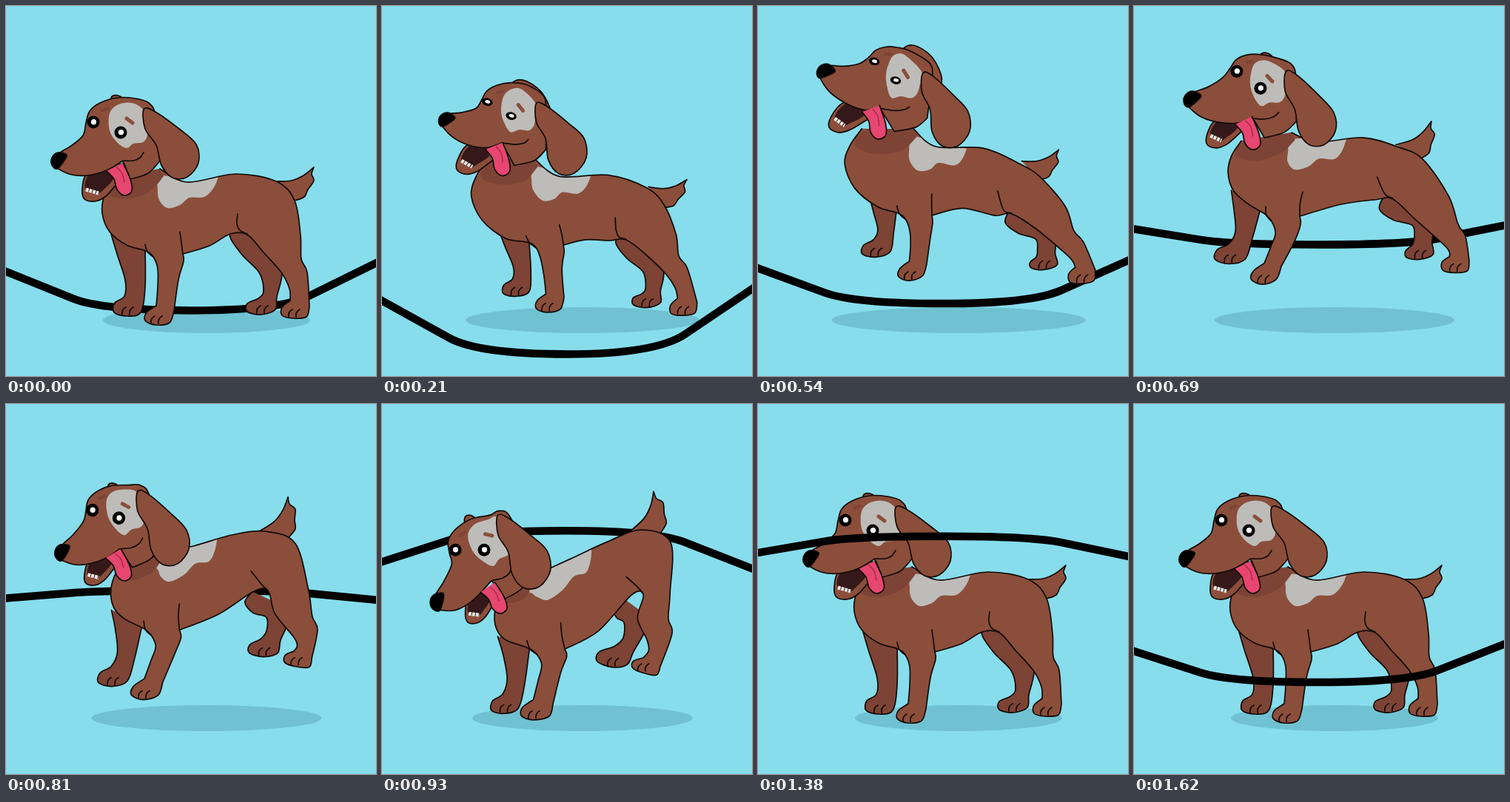
Write an HTML page with a canvas that moves like this. It is 500 px wide and 500 px high and loops after 1.65 s.

```html
<!DOCTYPE html>
<html>
<head>
<meta charset="utf-8">
<title>Dog jumping rope</title>
<style>
html, body { margin: 0; width: 100%; height: 100%; overflow: hidden; background: #87ddec; }
canvas { display: block; }
</style>
</head>
<body>
<canvas id="stage" width="500" height="500"></canvas>
<script>
const ctx = document.getElementById('stage').getContext('2d');
const LOOP = 1650;
const BROWN = '#8b4e3a', DARK = '#7d4335', GREY = '#bdbcb9', INK = '#120a08';

// Joints: x,y when standing, leaping, airborne and landing
const rig = {
  body: {
    nape: [208, 225, 205, 195, 213, 176, 195, 242],
    withers: [245, 238, 236, 217, 247, 184, 255, 209],
    back: [288, 230, 278, 225, 287, 182, 284, 196],
    croup: [365, 237, 350, 246, 355, 190, 350, 170],
    rump: [390, 263, 375, 267, 390, 207, 390, 187],
    hock: [399, 342, 408, 328, 438, 295, 387, 290],
    hindHeel: [410, 406, 444, 388, 453, 343, 376, 355],
    hindToe: [373, 413, 410, 400, 417, 352, 339, 352],
    knee: [372, 360, 400, 360, 418, 322, 358, 318],
    groin: [305, 308, 316, 318, 329, 262, 340, 257],
    belly: [275, 324, 275, 302, 280, 268, 292, 307],
    armpit: [239, 335, 248, 307, 224, 284, 247, 331],
    elbow: [199, 339, 214, 311, 186, 291, 209, 338],
    foreHeel: [227, 412, 257, 372, 199, 352, 231, 405],
    foreToe: [188, 420, 220, 384, 159, 364, 188, 416],
    chest: [163, 323, 168, 299, 155, 268, 168, 319],
    breast: [130, 280, 113, 232, 127, 225, 152, 290],
    throat: [145, 232, 140, 180, 145, 182, 170, 245]
  },
  head: {
    nose: [71, 208, 100, 99, 78, 125, 75, 267],
    stop: [106, 172, 150, 98, 122, 95, 95, 213],
    poll: [175, 125, 212, 84, 189, 69, 146, 150],
    earRoot: [187, 142, 229, 121, 206, 91, 157, 153],
    cheek: [180, 230, 205, 190, 190, 174, 178, 256],
    mouth: [160, 209, 168, 159, 163, 152, 150, 238],
    nearEye: [155, 171, 192, 123, 171, 111, 138, 197],
    farEye: [118, 157, 164, 99, 139, 88, 99, 197]
  },
  ear: {
    root: [187, 142, 229, 121, 206, 91, 157, 153],
    edge: [258, 188, 288, 167, 271, 145, 224, 199],
    tip: [236, 231, 263, 216, 248, 187, 203, 247]
  },
  farEar: {
    root: [143, 124, 206, 86, 172, 66, 113, 153],
    tip: [158, 170, 262, 150, 185, 110, 125, 195]
  },
  jaw: {
    lip: [111, 229, 122, 150, 111, 157, 119, 265],
    chin: [104, 255, 98, 174, 98, 181, 114, 290],
    hinge: [150, 238, 145, 176, 142, 171, 150, 269]
  },
  tongue: {
    root: [147, 218, 155, 159, 148, 155, 143, 248],
    tip: [160, 256, 163, 200, 160, 194, 160, 283]
  },
  tail: {
    root: [377, 250, 366, 258, 371, 197, 357, 172],
    tip: [416, 218, 407, 239, 402, 156, 367, 118]
  },
  farFore: {
    shoulder: [150, 335, 178, 312, 135, 275, 164, 340],
    elbow: [188, 330, 205, 302, 172, 272, 200, 330],
    toe: [146, 410, 173, 356, 110, 338, 148, 410],
    heel: [186, 405, 210, 346, 155, 333, 188, 402]
  },
  farHind: {
    hip: [320, 290, 340, 310, 340, 258, 325, 265],
    knee: [373, 363, 391, 353, 404, 300, 357, 303],
    shank: [348, 385, 367, 366, 379, 312, 326, 316],
    toe: [326, 408, 356, 383, 368, 336, 292, 342],
    heel: [365, 402, 391, 377, 404, 328, 335, 344]
  }
};

// Outlines of the standing dog, each carried by one group of joints. "|" marks a corner.
const outlines = {
  body: '208,220 245,238 310,227 365,237 390,263 398,310 399,342 407,360 410,406| 406,420 388,422 373,418 373,407 384,398| 383,382 372,360 348,333 326,309 303,308 275,324 239,335| 240,345 233,370 227,412| 221,428 202,431 188,425 190,414 203,405| 205,380 205,355 199,339 189,331 163,323 140,305 130,280 133,255 145,232',
  backPatch: '208,230 245,233 288,228| 281,245 268,258 248,259 235,269 218,273 207,262 205,248',
  neckShade: '140,256 165,261 195,250 213,230| 190,205 140,240|',
  thigh: '313,281 312,294 316,303 326,308',
  armpit: '235,305 237,320 239,335',
  elbow: '188,322 191,332 199,339',
  farFore: '142,308 150,335 161,370 160,392 147,401 146,414 163,419 182,414 188,380 188,325',
  farHind: '320,285 302,307 318,335 342,360 348,385 341,395 326,402 326,413 345,417 364,410 366,393 373,363 370,330',
  tail: '363,237 385,236 402,229 416,218| 413,227 416,236 408,248 403,258 390,263',
  head: '63,213 72,199 88,189 104,175 108,158 113,142 127,131 150,124 175,125 193,131 202,148 209,208| 192,226 168,234| 158,209| 136,222 110,229 85,227',
  facePatch: '140,145 152,133 170,131 185,140 190,160 191,175 185,184 172,186 163,192 150,184 140,168',
  nose: '62,205 70,198 82,201 78,210 69,220 62,215',
  smile: '160,209 172,209 181,205 186,198',
  brow: '163,152 171,158',
  farBrow: '130,141 138,138',
  ear: '186,140 200,142 234,166 257,187 260,212 245,231 225,232 210,215 203,188 188,166',
  farEar: '142,124 154,122 168,138 171,162 158,170 145,145',
  jaw: '108,228 103,248 106,261 120,264 135,257 150,240| 165,215 130,215|',
  mouth: '111,228 107,246 122,254 133,247 145,234 152,217 125,217',
  teeth: '108,248 125,253',
  tongue: '136,223 146,234 150,248 160,256 170,250 168,234 158,212',
  tongueLine: '150,218 157,226 160,238'
};
const carriers = {
  backPatch: 'body', neckShade: 'body', thigh: 'body', armpit: 'body', elbow: 'body',
  facePatch: 'head', nose: 'head', smile: 'head', brow: 'head', farBrow: 'head',
  mouth: 'jaw', teeth: 'jaw', tongueLine: 'tongue'
};
const loops = new Set(['backPatch', 'neckShade', 'farEar', 'head', 'jaw', 'mouth', 'facePatch', 'ear', 'nose']);

const shapes = {};
for (const name in outlines) {
  const marks = outlines[name].split(' ');
  shapes[name] = {
    points: marks.map(m => m.split(',').map(parseFloat)),
    corner: marks.map(m => m.endsWith('|'))
  };
}

const poseTimes = [0, 390, 690, 930, 1100];
const squint = [[1], [0.3], [1], [1], [1]];
const shadowRadius = [[140], [175], [162], [149], [140]];

// Rope: height of the middle, and how far it hangs below the left edge
const ropeTimes = [-30, 0, 200, 390, 690, 930, 1100, 1200, 1380, 1620, 1650, 1800];
const ropeKeys = [[375, 43], [411, 54], [469, 74], [464, 69], [323, 22], [172, -43],
  [30, -64], [14, -50], [178, -23], [375, 43], [411, 54], [469, 74]];

// Smooth interpolation between keys, at rest on both ends
function blend(times, keys, t) {
  const last = times.length - 1;
  if (t >= times[last]) return keys[last];
  let i = 0;
  while (t >= times[i + 1]) i++;
  const span = times[i + 1] - times[i], u = (t - times[i]) / span, v = 1 - u;
  const slope = (k, j) => k > 0 && k < last
    ? (keys[k + 1][j] - keys[k - 1][j]) / (times[k + 1] - times[k - 1]) * span : 0;
  return keys[i].map((a, j) => a * v * v * (1 + 2 * u) + keys[i + 1][j] * u * u * (3 - 2 * u)
    + slope(i, j) * u * v * v - slope(i + 1, j) * u * u * v);
}

let now = 0;

// Rest and current position of every joint in a group
function jointsOf(group) {
  return Object.values(rig[group]).map(j => {
    const keys = [0, 2, 4, 6, 0].map(k => [j[k], j[k + 1]]);
    return { from: keys[0], to: blend(poseTimes, keys, now) };
  });
}

// Moves a point along with the joints: a local turn and scale, led by the nearest ones
function warp([x, y], joints) {
  const weights = joints.map(({ from }) => ((from[0] - x) ** 2 + (from[1] - y) ** 2 + 1) ** -1.5);
  const total = weights.reduce((a, b) => a + b);
  const mean = (side, k) => joints.reduce((sum, j, i) => sum + weights[i] * j[side][k], 0) / total;
  const px = mean('from', 0), py = mean('from', 1), qx = mean('to', 0), qy = mean('to', 1);
  let re = 0, im = 0, size = 0;
  joints.forEach(({ from, to }, i) => {
    const ax = from[0] - px, ay = from[1] - py, bx = to[0] - qx, by = to[1] - qy;
    re += weights[i] * (ax * bx + ay * by);
    im += weights[i] * (ax * by - ay * bx);
    size += weights[i] * (ax * ax + ay * ay);
  });
  const dx = x - px, dy = y - py;
  return [qx + (re * dx - im * dy) / size, qy + (im * dx + re * dy) / size];
}

function posed(name) {
  const joints = jointsOf(carriers[name] || name);
  return shapes[name].points.map(p => warp(p, joints));
}

// Smooth curve through the posed points
function outline(name) {
  const points = posed(name), n = points.length, loop = loops.has(name);
  const at = i => points[(i + n) % n];
  const sharp = i => shapes[name].corner[i % n] || (!loop && (i === 0 || i === n - 1));
  const path = new Path2D();
  path.moveTo(...at(0));
  for (let i = 0; i < (loop ? n : n - 1); i++) {
    const a = at(i), b = at(i + 1);
    const before = sharp(i) ? a : at(i - 1), after = sharp(i + 1) ? b : at(i + 2);
    path.bezierCurveTo(a[0] + (b[0] - before[0]) / 6, a[1] + (b[1] - before[1]) / 6,
      b[0] - (after[0] - a[0]) / 6, b[1] - (after[1] - a[1]) / 6, ...b);
  }
  return path;
}

function stroke(path, color = INK, width = 1.7) {
  ctx.strokeStyle = color;
  ctx.lineWidth = width;
  ctx.stroke(path);
}

// Filled and outlined part, with flat markings kept inside it
function draw(name, fill, markings = {}) {
  const path = outline(name);
  ctx.fillStyle = fill;
  ctx.fill(path);
  ctx.save();
  ctx.clip(path);
  for (const mark in markings) {
    ctx.fillStyle = markings[mark];
    ctx.fill(outline(mark));
  }
  ctx.restore();
  stroke(path);
}

function ellipse(x, y, rx, ry, color, turn = 0) {
  ctx.fillStyle = color;
  ctx.beginPath();
  ctx.ellipse(x, y, rx, ry, turn, 0, 7);
  ctx.fill();
}

function toes(name, index) {
  const [x, y] = posed(name)[index];
  const path = new Path2D();
  for (const dx of [-6, 4]) {
    path.moveTo(x + dx, y - 2);
    path.quadraticCurveTo(x + dx - 1, y - 9, x + dx + 5, y - 12);
  }
  stroke(path);
}

function eye([x, y], open) {
  const turn = (1 - open) * 0.6;
  ellipse(x, y, 5.5 + 3 * open, 8.5 * open, '#000', turn);
  ellipse(x + 0.5, y - 0.3, 3.6, 3.6 * open, '#fff', turn);
}

function drawRope() {
  const [middle, sag] = blend(ropeTimes, ropeKeys, now);
  const left = middle - sag, right = left - sag * 0.22;
  const path = new Path2D();
  path.moveTo(-4, left);
  path.lineTo(90, left + sag * 0.7);
  path.quadraticCurveTo(130, middle, 250, middle);
  path.quadraticCurveTo(370, middle, 410, right + (middle - right) * 0.7);
  path.lineTo(504, right);
  stroke(path, '#000', 10.5);
}

function drawDog() {
  draw('tail', BROWN);
  draw('farFore', DARK);
  toes('farFore', 6);
  draw('farHind', DARK);
  toes('farHind', 8);
  draw('body', BROWN, { backPatch: GREY, neckShade: DARK });
  toes('body', 10);
  toes('body', 25);
  for (const line of ['thigh', 'armpit', 'elbow']) stroke(outline(line));

  draw('farEar', BROWN);
  draw('jaw', BROWN, { mouth: '#35191a' });
  ctx.setLineDash([3.8, 1]);
  ctx.lineCap = 'butt';
  stroke(outline('teeth'), '#e8e6e2', 5);
  ctx.setLineDash([]);
  ctx.lineCap = 'round';
  draw('head', BROWN, { facePatch: GREY });
  draw('tongue', '#e6466f');
  stroke(outline('tongueLine'), '#a52547', 1.3);
  stroke(outline('smile'));
  stroke(outline('brow'), BROWN, 5);
  stroke(outline('farBrow'), DARK, 4);
  const [open] = blend(poseTimes, squint, now);
  const joints = jointsOf('head');
  for (const name of ['nearEye', 'farEye']) eye(warp(rig.head[name], joints), Math.max(open, 0.28));
  draw('nose', '#000');
  draw('ear', BROWN);
}

function frame(time) {
  now = time % LOOP;
  const ropeInFront = now >= 1125;
  const lift = now > 390 && now < 690 ? 8 * Math.sin(Math.PI * (now - 390) / 300) : 0;

  ctx.fillStyle = '#87ddec';
  ctx.fillRect(0, 0, 500, 500);
  ctx.lineCap = ctx.lineJoin = 'round';
  ellipse(271, 424.5, blend(poseTimes, shadowRadius, now)[0], 17.5, '#70c2d2');
  if (!ropeInFront) drawRope();
  ctx.save();
  ctx.translate(0, -lift);
  drawDog();
  ctx.restore();
  if (ropeInFront && now >= 1195) drawRope();
}

function tick() {
  frame(performance.now());
  requestAnimationFrame(tick);
}
tick();
</script>
</body>
</html>
```
